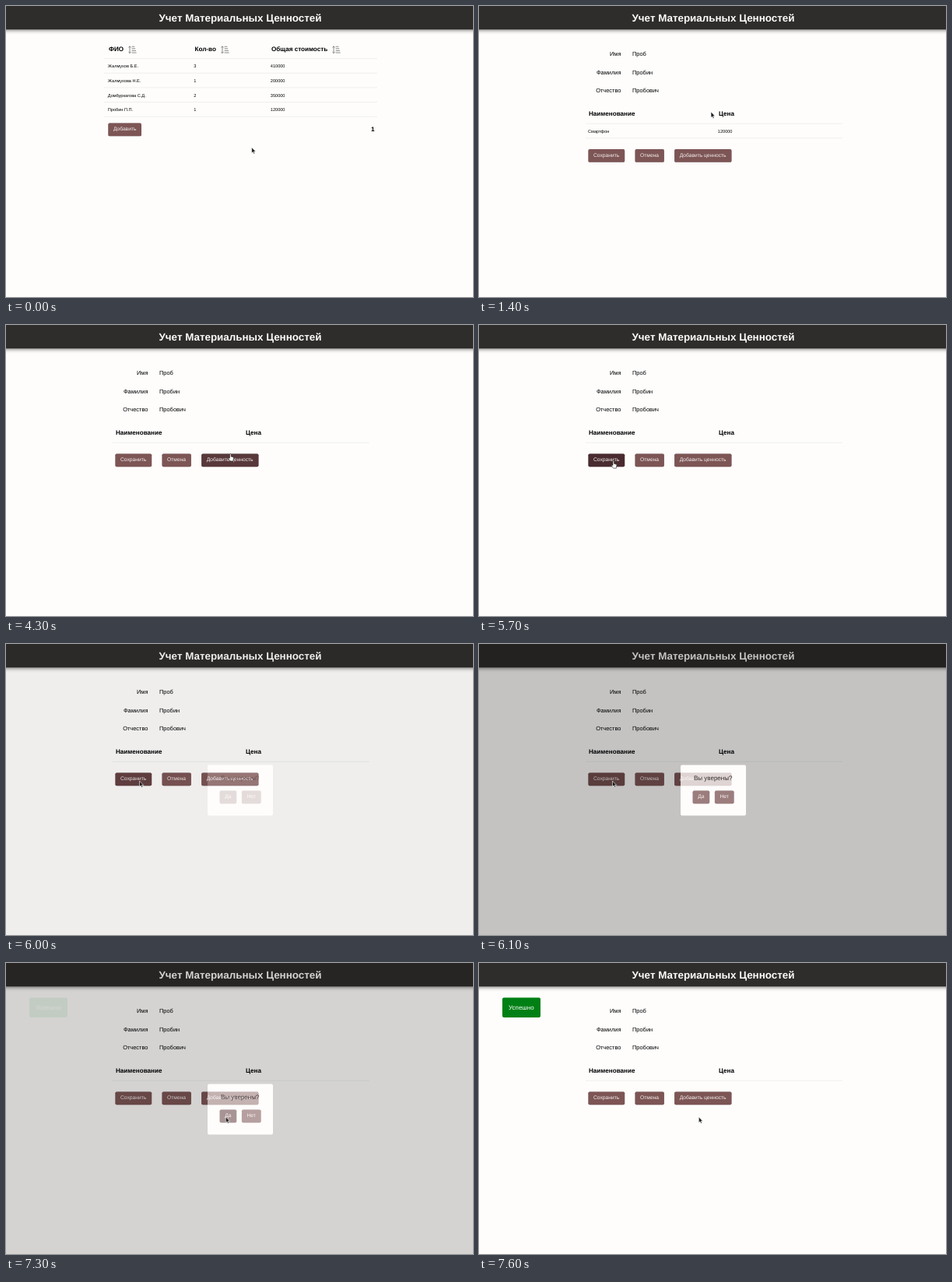
Write an HTML page that moves like this. It is 600 px wide and 374 px high and loops after 8 s.

```html
<!DOCTYPE html>
<html lang="ru">
<head>
<meta charset="utf-8">
<title>Учет Материальных Ценностей</title>
<style>
html, body { margin: 0; width: 100%; height: 100%; overflow: hidden; background: #fefdfc; }
svg { display: block; width: 100%; height: 100%; }
text { font-family: "Liberation Sans", Arial, sans-serif; text-rendering: geometricPrecision; }
.title { font-size: 13.4px; font-weight: bold; fill: #fdfcfb; text-anchor: middle; }
.head { font-size: 8.1px; font-weight: bold; }
.cell { font-size: 5.6px; }
.field { font-size: 7.45px; }
.label { font-size: 7.45px; text-anchor: end; }
.caption { font-size: 6.7px; fill: #f6f1f0; }
.notice { font-size: 8px; }
.rule { stroke: #e6e4e3; stroke-width: .6; }
.button rect { filter: drop-shadow(0 .3px .5px #0004); }
.bar { fill: #2f2d2b; filter: drop-shadow(0 1px 2.5px #0008); }
.icon { fill: none; stroke: #6c6c6c; stroke-width: .8; }
</style>
</head>
<body>
<svg id="stage" viewBox="0 0 600 374"></svg>
<script>
const LOOP = 8000, STEP = 100;
const PAGE_CHANGE = 1400, ITEM_REMOVED = 4300, MODAL_OPEN = 6000, MODAL_CLOSE = 7300;
const ROW = 18.65, BUTTON_HEIGHT = 16.8;
const BASE = [125, 85, 85], HOVER = [64, 36, 40];

const buttons = {
  add: { layer: 'list', x: 131.3, y: 150.5, w: 42.7, label: 'Добавить' },
  save: { layer: 'form', x: 140.4, y: 165.4, w: 46.8, label: 'Сохранить' },
  cancel: { layer: 'form', x: 200.5, y: 165.4, w: 37.4, label: 'Отмена' },
  addItem: { layer: 'form', x: 251.1, y: 165.4, w: 73.4, label: 'Добавить ценность' },
  yes: { layer: 'modal', x: 274.6, y: 188.4, w: 21.6, label: 'Да' },
  no: { layer: 'modal', x: 302.9, y: 188.4, w: 24.7, label: 'Нет' }
};
const people = [
  ['Жалмухов Б.Е.', 3, 410000],
  ['Жалмухова Н.Е.', 1, 200000],
  ['Домбуркагова С.Д.', 2, 350000],
  ['Пробин П.П.', 1, 120000]
];
const columns = [['ФИО', 132], ['Кол-во', 242.5], ['Общая стоимость', 341]];
const iconX = [157, 276, 419];
const fields = [['Имя', 'Проб'], ['Фамилия', 'Пробин'], ['Отчество', 'Пробович']];

const text = (cls, x, y, s) => `<text class="${cls}" x="${x}" y="${y}">${s}</text>`;
const rule = (x1, x2, y) => `<path class="rule" d="M${x1} ${y}H${x2}"/>`;
const sortIcon = x => `<path class="icon" transform="translate(${x} 51)" d="M2 .6V9.8M.4 2.4 2 .8 3.6 2.4
  M.4 8 2 9.6 3.6 8M4.6 1.2H8.4M4.6 3.8H9.2M4.6 6.4H10M4.6 9H10.6"/>`;
const buttonsOf = layer => Object.entries(buttons).filter(([, b]) => b.layer === layer)
  .map(([id, { x, y, w, label }]) => `<g class="button" id="${id}">
    <rect x="${x}" y="${y}" width="${w}" height="${BUTTON_HEIGHT}" rx="1.9"/>
    ${text('caption', x + 6.6, y + 9.9, label)}</g>`).join('');

const listPage = columns.map(([s, x], i) => text('head', x, 58.4, s) + sortIcon(iconX[i])).join('')
  + rule(126, 477, 67.6)
  + people.map((row, i) => row.map((s, j) => text('cell', columns[j][1] - 1.2, 79.3 + i * ROW, s)).join('')
    + rule(126, 477, 67.6 + (i + 1) * ROW)).join('')
  + buttonsOf('list') + text('head', 469, 161.3, '1');

const formPage = fields.map(([name, value], i) =>
    text('label', 182.5, 64.1 + i * 23.6, name) + text('field', 197, 64.1 + i * 23.6, value)).join('')
  + text('head', 141, 141.4, 'Наименование') + text('head', 308, 141.4, 'Цена') + rule(137, 467, 151.2)
  + `<g id="item">${text('cell', 140, 163, 'Смартфон')}${text('cell', 306.8, 163, '120000')}${rule(137, 467, 169.8)}</g>`
  + `<g id="actions">${buttonsOf('form')}</g>`;

stage.innerHTML = `
  <rect width="600" height="374" fill="#fefdfc"/>
  <rect class="bar" x="-20" y="-20" width="640" height="50.2"/>
  ${text('title', 301, 19.5, 'Учет Материальных Ценностей')}
  <g id="list">${listPage}</g>
  <g id="form">${formPage}</g>
  <g id="modal">
    <rect width="600" height="374" opacity=".3"/>
    <rect x="259" y="155.6" width="84" height="65" rx="2" fill="#fefdfc"/>
    ${text('notice', 276, 174.6, 'Вы уверены?')}${buttonsOf('modal')}
  </g>
  <g id="toast"><rect x="30" y="44.6" width="49" height="25.4" rx="2" fill="#008014"/>
    <text class="notice" x="38" y="59.8" fill="#fff">Успешно</text></g>
  <g id="cursor" stroke-linejoin="round">
    <path id="arrow" d="M0 0V7.4L1.7 5.9 2.8 8.4 4.1 7.8 3 5.4H5.2Z" fill="#1c1c1c" stroke="#fff" stroke-width=".6"/>
    <path id="hand" transform="translate(-1.6 -1.7)" fill="#fff" stroke="#222" stroke-width=".6"
      d="M2.1 6.2V1Q2.9-.3 3.7 1V4L6.4 4.7Q7.2 5 7 6.2L6.4 9.8H2.8L.3 6.7Q.1 5.6 1.1 5.7Z"/>
  </g>`;

const el = Object.fromEntries([...stage.querySelectorAll('[id]')].map(e => [e.id, e]));

const moves = [
  { from: 300, to: 900, x: 298, y: 136 },
  { from: 2100, to: 2400, x: 308, y: 147 },
  { from: 2400, to: 2900, x: 278.5, y: 161.5 },
  { from: 3800, to: 3900, x: 287, y: 166.8 },
  { from: 4900, to: 5300, x: 232, y: 191 },
  { from: 5400, to: 5650, x: 171.5, y: 176 },
  { from: 6200, to: 6400, x: 234, y: 170 },
  { from: 6500, to: 6900, x: 282.3, y: 197.8 }
];

const smooth = (t, from, to) => {
  const u = Math.min(1, Math.max(0, (t - from) / (to - from)));
  return u * u * (3 - 2 * u);
};
const pointerAt = t => moves.reduce(([x, y], m) => {
  const u = smooth(t, m.from, m.to);
  return [x + (m.x - x) * u, y + (m.y - y) * u];
}, [315.6, 181.7]);

const layerAt = t => t < PAGE_CHANGE ? 'list' : t >= MODAL_OPEN && t < MODAL_CLOSE ? 'modal' : 'form';
// The open item row pushes the form buttons down.
const dropAt = t => t < ITEM_REMOVED ? ROW : 0;

function targetAt(t) {
  const [px, py] = pointerAt(t), layer = layerAt(t);
  const inside = (x, y, w, h) => px >= x && px <= x + w && py >= y && py <= y + h;
  if (layer === 'list' && inside(126, 67.6, 351, ROW * people.length)) return 'row';
  if (layer === 'form' && t < ITEM_REMOVED && inside(137, 151.2, 330, ROW)) return 'row';
  return Object.keys(buttons).find(id => {
    const b = buttons[id], drop = layer === 'form' ? dropAt(t) : 0;
    return b.layer === layer && inside(b.x, b.y + drop, b.w, BUTTON_HEIGHT);
  });
}

// Hover colour follows the pointer over the last few steps.
const hoverAmount = (id, t) => [.6, .25, .15]
  .reduce((sum, weight, i) => sum + (targetAt(t - i * STEP) === id ? weight : 0), 0);

const show = (e, on) => e.style.display = on ? '' : 'none';

function draw(t) {
  show(el.list, t < PAGE_CHANGE);
  show(el.form, t >= PAGE_CHANGE);
  show(el.item, t < ITEM_REMOVED);
  el.actions.setAttribute('transform', `translate(0 ${dropAt(t)})`);

  for (const id in buttons) {
    const amount = hoverAmount(id, t);
    const rgb = BASE.map((c, i) => Math.round(c + (HOVER[i] - c) * amount));
    el[id].querySelector('rect').style.fill = `rgb(${rgb})`;
  }

  el.modal.style.opacity = smooth(t, 5930, 6180) - smooth(t, 7170, 7450);
  el.toast.style.opacity = smooth(t, 7250, 7550);

  const clickable = targetAt(t) !== undefined;
  el.cursor.setAttribute('transform', `translate(${pointerAt(t)})`);
  show(el.hand, clickable);
  show(el.arrow, !clickable);
}

const begin = performance.now();
function tick() {
  const t = (performance.now() - begin) % LOOP;
  draw(Math.floor(t / STEP) * STEP);
  requestAnimationFrame(tick);
}
tick();
</script>
</body>
</html>
```
